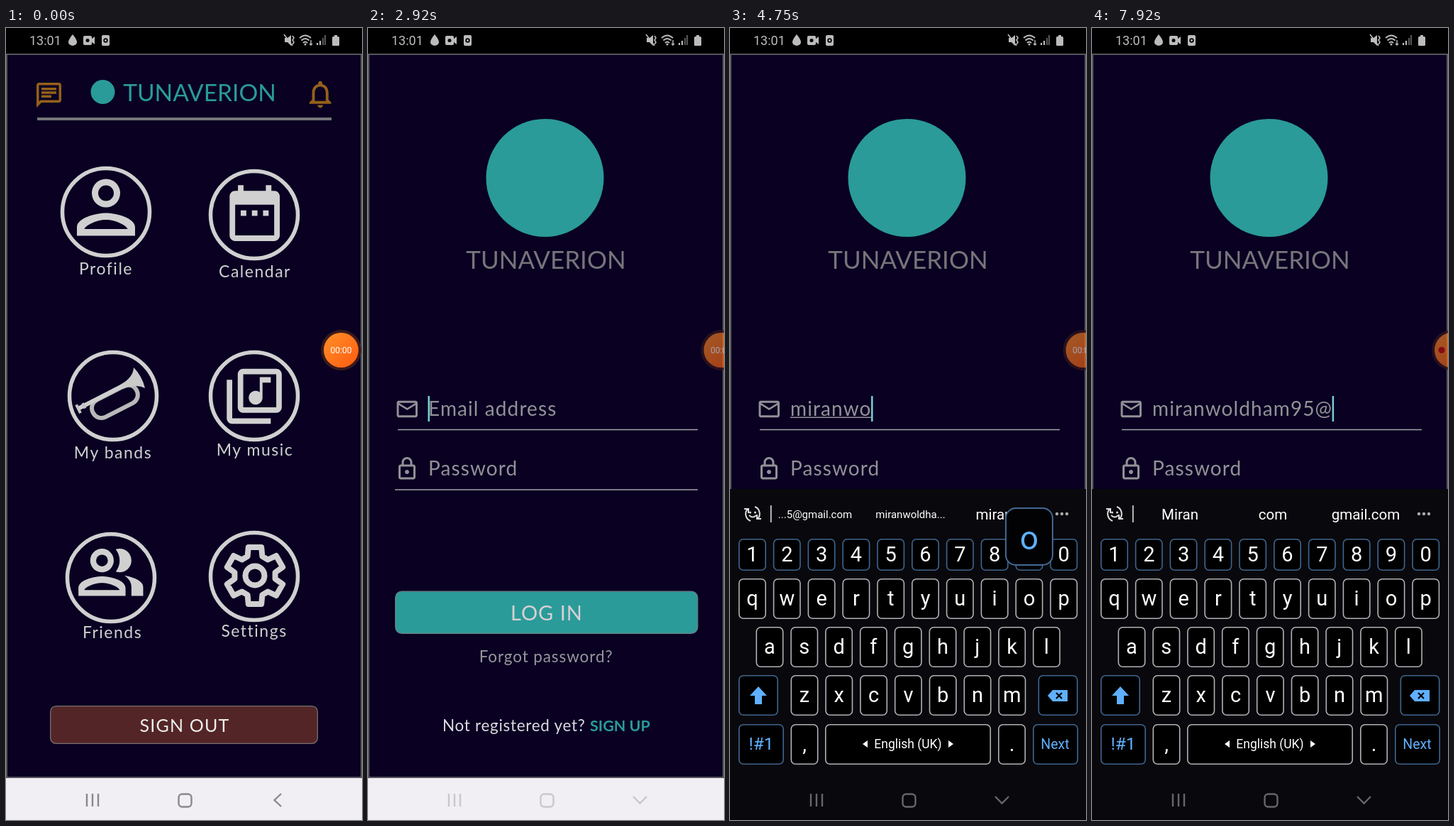
An HTML page that plays this animation: 502 px wide and 1115 px high, repeating every 8000 ms.

```html
<!DOCTYPE html>
<html lang="en">
<head>
<meta charset="utf-8">
<title>Sign-in demo</title>
<style>
html, body { margin: 0; width: 100%; height: 100%; overflow: hidden; background: #000; }
svg { display: block; width: 502px; height: 1115px; }
text { font-family: Lato, "Open Sans", sans-serif; font-weight: 400; }
.ui, .ui text { font-family: Roboto, Inter, sans-serif; }
</style>
</head>
<body>
<svg id="stage" viewBox="0 0 502 1115"></svg>
<script>
const BG = '#090022', TEAL = '#2a9b99', PALE = '#d0d0d0', GREY = '#939196', BLUE = '#5fb0ff';
const BRAND = 'TUNAVERION', USER = 'miranwoldham';

const attrs = o => Object.entries(o).map(([k, v]) => ` ${k}="${v}"`).join('');
const text = (s, x, y, size, fill, more = {}) =>
  `<text${attrs({ x, y, 'font-size': size, fill, ...more })}>${s}</text>`;
const mid = (s, x, y, size, fill, more = {}) =>
  text(s, x, y, size, fill, { 'text-anchor': 'middle', ...more });
const rect = (x, y, width, height, fill, more = {}) =>
  `<rect${attrs({ x, y, width, height, fill, ...more })}/>`;
// Rounded box whose border lies inside its bounds
const box = (x, y, w, h, fill, stroke, rx = 6, sw = 1.6) =>
  rect(x + sw / 2, y + sw / 2, w - sw, h - sw, fill, { rx, stroke, 'stroke-width': sw });
const circle = (cx, cy, r, fill, more = {}) => `<circle${attrs({ cx, cy, r, fill, ...more })}/>`;
const line = (d, stroke, width, more = {}) =>
  `<path${attrs({ d, stroke, 'stroke-width': width, fill: 'none', ...more })}/>`;
const icon = (d, x, y, s, fill) =>
  `<path${attrs({ d, fill, transform: `translate(${x} ${y}) scale(${s})`, 'fill-rule': 'evenodd' })}/>`;
const group = (id, body, more = {}) => `<g${attrs({ id, ...more })}>${body}</g>`;

const windowBack = rect(0, 0, 502, 1115, '#000') +
  rect(1, 37, 500, 1018, BG, { stroke: '#6d6b70', 'stroke-width': 1.6 }) +
  rect(0, 1056, 502, 59, '#f1eff4');

// Home screen
const CHAT = 'M4 4h16v12H5.17L4 17.17V4m0-2c-1.1 0-1.99.9-1.99 2L2 22l4-4h14c1.1 0 2-.9 2-2V4c0-1.1-.9-2-2-2H4zm2 10h8v2H6v-2zm0-3h12v2H6V9zm0-3h12v2H6V6z';
const BELL = 'M12 22c1.1 0 2-.9 2-2h-4c0 1.1.9 2 2 2zm6-6v-5c0-3.07-1.63-5.64-4.5-6.32V4c0-.83-.67-1.5-1.5-1.5s-1.5.67-1.5 1.5v.68C7.64 5.36 6 7.92 6 11v5l-2 2v1h16v-1l-2-2zm-2 1H8v-6c0-2.48 1.51-4.5 4-4.5s4 2.02 4 4.5v6z';
const DATES = 'M7 11h2v2H7v-2zm14-5v14c0 1.1-.9 2-2 2H5c-1.11 0-2-.9-2-2l.01-14c0-1.1.88-2 1.99-2h1V2h2v2h8V2h2v2h1c1.1 0 2 .9 2 2zM5 20h14V9H5v11zm10-7h2v-2h-2v2zm-4 0h2v-2h-2v2z';
const MUSIC = 'M20 2H8c-1.1 0-2 .9-2 2v12c0 1.1.9 2 2 2h12c1.1 0 2-.9 2-2V4c0-1.1-.9-2-2-2zm0 14H8V4h12v12zm-7.5-1c1.38 0 2.5-1.12 2.5-2.5V7h3V5h-4v5.51c-.42-.32-.93-.51-1.5-.51-1.38 0-2.5 1.12-2.5 2.5s1.12 2.5 2.5 2.5zM4 6H2v14c0 1.1.9 2 2 2h14v-2H4V6z';
const PERSON = 'M12 4a4 4 0 1 0 0 8a4 4 0 1 0 0-8zm0 1.8a2.2 2.2 0 1 1 0 4.4a2.2 2.2 0 1 1 0-4.4zM12 13.6c-2.67 0-8.2 1.3-8.2 4v2.4h16.4v-2.4c0-2.7-5.53-4-8.2-4zM5.9 18.1c.3-1 3.3-2.6 6.1-2.6s5.8 1.6 6.1 2.6z';
const PAIR = 'M16.67 13.13C18.04 14.06 19 15.32 19 17v3h4v-3c0-2.18-3.57-3.47-6.33-3.87zM15 12c2.21 0 4-1.79 4-4s-1.79-4-4-4c-.47 0-.91.1-1.33.24C14.5 5.27 15 6.58 15 8s-.5 2.73-1.33 3.76c.42.14.86.24 1.33.24zM9 4a4 4 0 1 0 0 8a4 4 0 1 0 0-8zm0 2a2 2 0 1 1 0 4a2 2 0 1 1 0-4zM9 13.4c-2.67 0-8 1.2-8 4V20h16v-2.6c0-2.8-5.33-4-8-4zM3 18c.3-1 3.3-2.4 6-2.4s5.7 1.4 6 2.4z';
const MAIL = 'M22 6c0-1.1-.9-2-2-2H4c-1.1 0-2 .9-2 2v12c0 1.1.9 2 2 2h16c1.1 0 2-.9 2-2V6zm-2 0l-8 5-8-5h16zm0 12H4V8l8 5 8-5v10z';
const LOCK = 'M18 8h-1V6c0-2.76-2.24-5-5-5S7 3.24 7 6v2H6c-1.1 0-2 .9-2 2v10c0 1.1.9 2 2 2h12c1.1 0 2-.9 2-2V10c0-1.1-.9-2-2-2zM9 6c0-1.66 1.34-3 3-3s3 1.34 3 3v2H9V6zm9 14H6V10h12v10zm-6-3c1.1 0 2-.9 2-2s-.9-2-2-2-2 .9-2 2 .9 2 2 2z';

function gear(x, y) {
  const pts = [];
  for (let k = 0; k < 6; k++)
    for (const [deg, r] of [[-21, 29], [-13, 41], [13, 41], [21, 29]]) {
      const a = (k * 60 - 90 + deg) * Math.PI / 180;
      pts.push((x + r * Math.cos(a)).toFixed(1) + ' ' + (y + r * Math.sin(a)).toFixed(1));
    }
  return line(`M${pts.join('L')}Z`, PALE, 8, { 'stroke-linejoin': 'round' }) +
    circle(x, y, 13.5, 'none', { stroke: PALE, 'stroke-width': 8 });
}

const horn = `<g transform="translate(150 518) rotate(-27)">` +
  rect(-35, -5, 69, 27, 'none', { rx: 13, stroke: '#b9b9b9', 'stroke-width': 6 }) +
  line('M-50 -6H30', '#cfcfcf', 6) + line('M-51 -12V1M-42 -10V-2', '#c4c4c4', 4) +
  '<path d="M18 -9Q38 -10 45 -22Q50 -6 46 11Q38 0 18 -2Z" fill="#cacaca"/></g>';

const tile = (label, x, y, labelX, labelY, art) =>
  circle(x, y, 61.5, 'none', { stroke: PALE, 'stroke-width': 5.5 }) + art +
  mid(label, labelX, labelY, 23, PALE, { 'letter-spacing': 1.5 });

const home = group('home', windowBack +
  icon(CHAT, 39.5, 73.5, 1.75, '#95601a') + icon(BELL, 420, 70, 1.93, '#95601a') +
  circle(136.5, 90, 17, TEAL) +
  mid(BRAND, 273, 103, 33.5, TEAL) +
  line('M44 128H459', '#77757a', 4) +
  tile('Profile', 141, 259, 141, 347, icon(PERSON, 81, 192.5, 5, PALE)) +
  tile('Calendar', 350, 263, 351, 351, icon(DATES, 303.5, 213.5, 3.93, PALE)) +
  tile('My bands', 151, 518, 151, 606, horn) +
  tile('My music', 350, 518, 351, 602, icon(MUSIC, 303.5, 472, 3.88, PALE)) +
  tile('Friends', 148, 774, 150, 859, icon(PAIR, 98, 716.5, 4.15, PALE)) +
  tile('Settings', 350, 772, 350, 857, gear(351, 771)) +
  box(62, 954, 378, 54, '#542527', '#77706f', 8, 1.3) +
  mid('SIGN OUT', 252, 991, 25, '#eee', { 'letter-spacing': 1.2 }));

// Login screen
const field = { 'letter-spacing': 1.1 };
const login = group('login', windowBack +
  circle(249.5, 211, 83, TEAL) +
  mid(BRAND, 251, 339, 35, '#77757a') +
  icon(MAIL, 37.6, 518.9, 1.47, GREY) +
  text('Email address', 85, 546, 28, GREY, { id: 'hint', ...field }) +
  text('', 85, 546, 28, GREY, { id: 'typed', ...field }) +
  rect(85, 547.5, 0, 1.5, GREY, { id: 'under' }) +
  rect(84.5, 518, 2.5, 36, '#79cdd0', { id: 'caret' }) +
  line('M42 565.5H465', '#a5a3a8', 1.6) +
  icon(LOCK, 37, 602.5, 1.5, GREY) +
  text('Password', 85, 630, 28, GREY, field) +
  line('M38 650H465', '#a5a3a8', 1.6) +
  box(38, 792.5, 427.5, 60.5, TEAL, '#6f7f85', 9, 1.3) +
  mid('LOG IN', 252, 834, 29, '#d8d0d4', { 'letter-spacing': 1 }) +
  mid('Forgot password?', 251, 893, 22.5, '#98969c', { 'letter-spacing': .9 }) +
  text('Not registered yet?', 105, 990, 22.5, '#dcdadf', { 'letter-spacing': .7 }) +
  text('SIGN UP', 313, 990, 21.5, TEAL, { style: 'font-weight:700' }));

// System bar
const SYS = '#bcbcbc';
const status = group('status',
  text('13:01', 33, 24, 18, SYS) +
  '<path d="M94 9q12 14 0 16q-12 -2 0 -16z" fill="#bcbcbc"/>' +
  rect(109, 11, 12, 13, SYS, { rx: 2 }) + '<path d="M120 16l5 -4v11l-5 -4z" fill="#bcbcbc"/>' +
  circle(115, 17.5, 2.5, '#000') +
  rect(135, 10, 11, 15, SYS, { rx: 2 }) + circle(140.5, 17.5, 3.2, '#000') + circle(140.5, 17.5, 1.4, SYS) +
  '<path d="M393 14h4l5 -4v15l-5 -5h-4z" fill="#bcbcbc"/>' +
  line('M392 9L404 25M404 11l2 3l-2 3l2 3l-2 3', SYS, 1.6) +
  line('M414 14q8 -7 16 0M416.5 17.5q5.5 -5 11 0M419 21q3 -3 6 0', SYS, 2) +
  circle(422, 23, 1.5, SYS) + line('M430 17v7m-2 -2l2 2l2 -2', SYS, 1.4) +
  line('M439 24v-3M443 24v-6', SYS, 2.2) + line('M447 24v-10M450 24v-14', '#555', 2.2) +
  rect(460, 12, 10, 13, SYS, { rx: 1.5 }) + rect(463, 10, 4, 3, SYS), { class: 'ui' });

const nav = group('nav',
  '<path d="M114 1078v18M122 1078v18M130 1078v18"/>' +
  '<rect x="243.500" y="1078.500" width="18" height="18" rx="5"/>'.replaceAll('.500', '.5') +
  '<path id="back"/>', { fill: 'none', 'stroke-width': 2.4 });

// Keyboard
const STEP = 48.8, ROWS = [719, 775, 843, 911, 980];
const spots = {};
const key = (x, y, w, h, blue) => box(x, y, w, h, '#000', blue ? '#3f6690' : '#b2b1b5');
function keyRow(chars, x, row) {
  const y = ROWS[row], h = row ? 57 : 45;
  return chars.split(' ').map((c, i) => {
    const kx = x + i * STEP;
    spots[c] = [kx, y, h];
    return key(kx, y, 39, h, !row) + mid(c, kx + 19.5, y + (row ? 38 : 32), 29, '#fff');
  }).join('');
}
const keyboard = group('keyboard',
  rect(0, 649, 502, 466, '#09080c') +
  line('M29 694a10.5 10.5 0 0 1 -4 -17M35 674a10.5 10.5 0 0 1 4 17M20 677h6v6M44 691h-6v-6', '#ddd', 2) +
  circle(28.5, 682, 1.5, '#ddd') + circle(35.5, 682, 1.5, '#ddd') + line('M27 686q5 5 10 0', '#ddd', 1.8) +
  rect(57, 672, 1.6, 24, '#ddd') + '<g id="words"></g>' +
  [461, 468, 475].map(x => circle(x, 684, 2.2, '#aaa')).join('') +
  keyRow('1 2 3 4 5 6 7 8 9 0', 12, 0) +
  key(12, 911, 56, 57, 1) + key(434.5, 911, 56, 57, 1) +
  '<path d="M448 940l7 -8h21v16h-21z" fill="#5fb0ff"/>' + line('M460 936l8 8m0 -8l-8 8', '#000', 2.2) +
  key(12, 980, 64, 57, 1) + keyRow(',', 85.5, 4) + key(134, 980, 234, 57) + keyRow('.', 378, 4) +
  key(427, 980, 64, 57, 1) + mid('Next', 458.5, 1015, 19.5, BLUE) +
  '<path d="M187 1008l7 -5v10zM315 1008l-7 -5v10z" fill="#fff"/>' +
  mid('English (UK)', 251, 1014, 17.5, '#fff') +
  group('letters',
    keyRow('q w e r t y u i o p', 12, 1) + keyRow('a s d f g h j k l', 36.5, 2) +
    keyRow('z x c v b n m', 85.5, 3) +
    '<path d="M40 927l12 13h-7v12h-10v-12h-7z" fill="#5fb0ff"/>' + mid('!#1', 44, 1016, 24.5, BLUE)) +
  group('symbols',
    keyRow('+ × ÷ = / _ € £ ¥ ₩', 12, 1) + keyRow('! @ # $ % ^ &amp; * ( )', 12, 2) +
    keyRow("- ' \" : ; ~ ?", 85.5, 3) +
    mid('1/2', 40, 948, 22, BLUE) + mid('ABC', 44, 1016, 22, BLUE)) +
  '<g id="press"></g>', { class: 'ui' });

const bubble = group('bubble',
  circle(0, 0, 28.5, '#3a1a1c') + circle(0, 0, 24.5, 'url(#glow)') +
  mid('', 0, 4.5, 12, '#fff', { id: 'timer' }) +
  circle(-14.5, 0, 4.5, '#d01010', { id: 'dot' }), { class: 'ui' });

const stage = document.getElementById('stage');
stage.innerHTML = '<defs><linearGradient id="glow" x2="1" y2="1"><stop stop-color="#ff9028"/>' +
  '<stop offset="1" stop-color="#ff5a10"/></linearGradient></defs>' +
  home + login + status + bubble + keyboard + nav;

const $ = id => document.getElementById(id);
const set = (id, o) => { for (const k in o) $(id).setAttribute(k, o[k]); };
const show = (id, on) => set(id, { display: on ? 'inline' : 'none' });
const ramp = (t, a, b) => Math.min(1, Math.max(0, (t - a) / (b - a)));
const FPS = 12;

// Each key goes down at this tick; its character lands one tick later.
const downs = [40, 44, 46, 48, 50, 52, 55, 58, 60, 62, 65, 68, 76, 79, 89];
const full = USER + '95@';

function suggestions(n) {
  if (!n) return '';
  const words = n < 3 ? ['morgen', 'moo', '']
    : n == full.length ? [USER[0].toUpperCase() + USER.slice(1, 5), 'com', 'gmail.com']
    : ['...5@gmail.com', USER.slice(0, 11) + '...', USER.slice(0, Math.min(n, 9))];
  return words.map((w, i) => w.includes('...')
    ? mid(w, [120, 254.5][i], 690, 15, '#fff')
    : mid(w, [124, 255, 386][i], 692, 20.5, '#fff')).join('');
}

function pressed(tick) {
  const i = downs.findLastIndex(d => d <= tick);
  if (i < 0 || tick >= downs[i] + 3) return '';
  const c = full[i], [x, y, h] = spots[c];
  const lit = tick == downs[i]
    ? box(x, y, 39, h, '#15253a', '#3f6690') + mid(c, x + 19.5, y + h / 2 + 9.5, 29, '#fff') : '';
  return lit + box(x - 14.5, y - 100, 68, 82, '#020205', '#436a94', 14, 2) +
    mid(c, x + 19.5, y - 41, 46, BLUE);
}

function draw(ms) {
  const tick = Math.floor(ms * FPS / 1000 + .05), t = tick * 1000 / FPS;
  const sliding = t > 1200 && t < 1600;

  const left = (1 - ramp(t, 1200, 1690)) ** 2.5;
  set('home', { transform: `translate(0 ${Math.round(-29.2 * (1 - left))})` });
  set('login', {
    transform: `translate(0 ${Math.round(307 * left)})`,
    opacity: t < 1200 ? 0 : .967 + .033 * ramp(t, 1340, 1600)
  });
  set('status', { opacity: sliding ? .75 : 1 });

  const n = downs.filter(d => d < tick).length;
  show('hint', !n);
  show('caret', tick >= 34);
  $('typed').textContent = full.slice(0, n);
  const w = n ? $('typed').getComputedTextLength() : 0;
  set('under', { width: n < full.length ? w : 0 });
  set('caret', { x: 84.5 + w });

  show('keyboard', t > 2920);
  set('keyboard', { transform: `translate(0 ${466 * (1 - ramp(t, 2910, 3170)) ** 2})` });
  const symbols = tick >= 83 && tick < 92;
  show('symbols', symbols);
  show('letters', !symbols);
  $('words').innerHTML = suggestions(n);
  $('press').innerHTML = pressed(tick);

  const open = tick >= 34;
  set('nav', { stroke: tick >= 36 ? '#68666b' : open ? '#c9c7cc' : sliding ? '#0d081c' : '#8a888d' });
  set('back', { d: open ? 'M374 1082l9.5 9.5l9.5 -9.5' : 'M388 1078l-9.5 9l9.5 9' });

  const aside = ramp(t, 1670, 1920), away = ramp(t, 5330, 5500);
  set('bubble', { transform: `translate(${472.5 + 25.5 * aside + 9.5 * away} 453.5)`, opacity: 1 - .37 * aside });
  $('timer').textContent = '00:0' + [1250, 2240, 3330, 4580].filter(s => t >= s).length;
  show('timer', away < 1);
  show('dot', away == 1);
}

function loop(now) {
  draw(now % 8000);
  requestAnimationFrame(loop);
}
draw(0);
requestAnimationFrame(loop);
</script>
</body>
</html>
```
